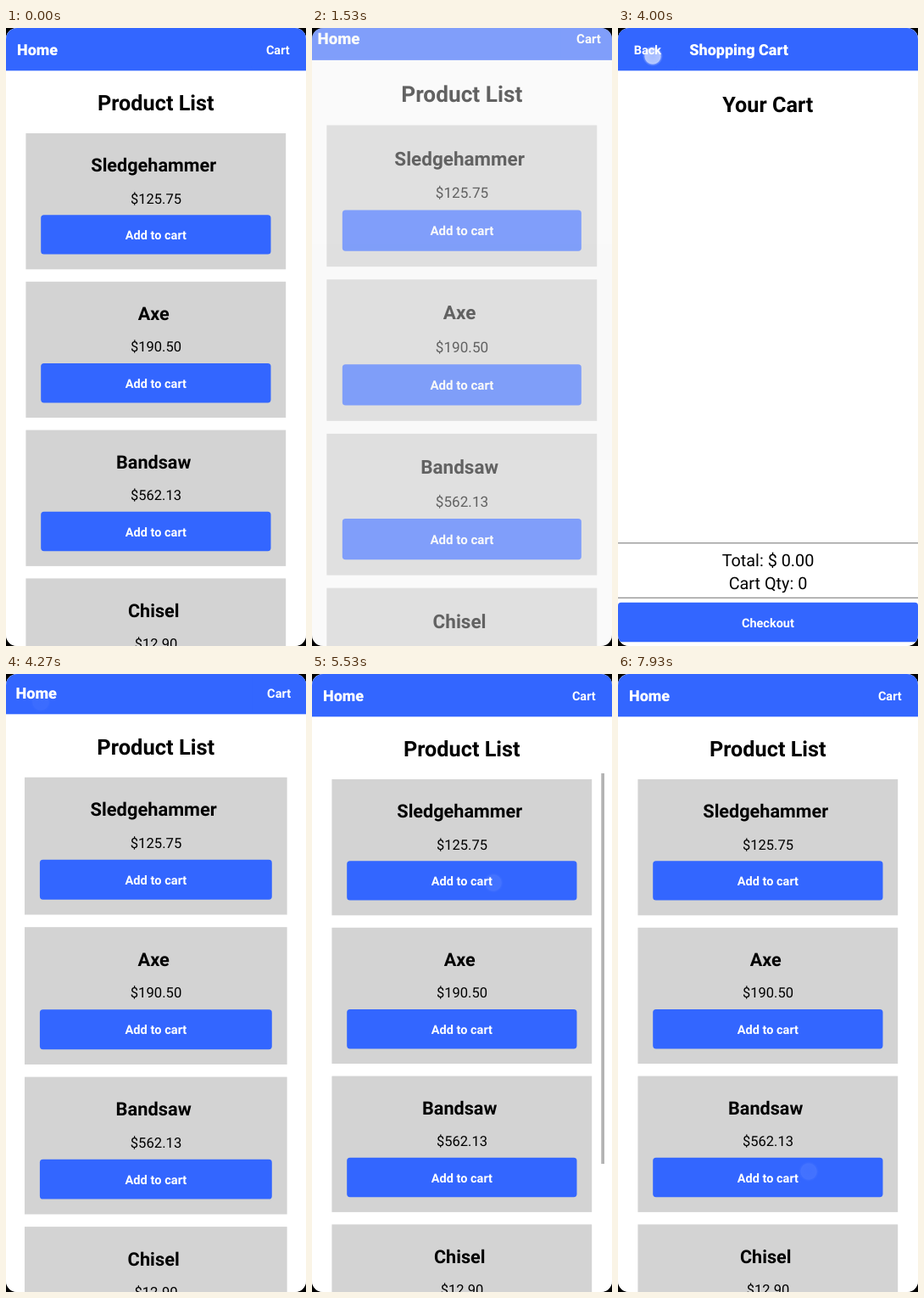
Animation of 354x728 px, one loop 8000 ms. Source, as an HTML page:

```html
<!DOCTYPE html>
<html lang="en">
<head>
<meta charset="utf-8">
<title>Tool shop</title>
<style>
  html, body { margin: 0; width: 100%; height: 100%; overflow: hidden; background: #000; }
  svg { display: block; width: 354px; height: 728px; border-radius: 13px; background: #f2f2f2; }
  text { font-family: Roboto, "Noto Sans", sans-serif; text-rendering: geometricPrecision; }
</style>
</head>
<body>
<svg id="stage" viewBox="0 0 354 728">
  <defs>
    <radialGradient id="spot">
      <stop offset="0" stop-color="#fff" stop-opacity=".56"/>
      <stop offset=".66" stop-color="#fff" stop-opacity=".62"/>
      <stop offset=".76" stop-color="#fff" stop-opacity=".66"/>
      <stop offset=".84" stop-color="#fff" stop-opacity=".24"/>
      <stop offset="1" stop-color="#fff" stop-opacity="0"/>
    </radialGradient>
  </defs>
</svg>
<script>
const LOOP = 8000;
const BLUE = '#3366ff', PRESSED = '#274bdb';
const PITCH = 174.8;
const stage = document.getElementById('stage');

function add(parent, tag, attrs, content) {
  const el = document.createElementNS('http://www.w3.org/2000/svg', tag);
  for (const key in attrs) el.setAttribute(key, attrs[key]);
  if (content) el.textContent = content;
  return parent.appendChild(el);
}
const box = (parent, x, y, width, height, fill, rx = 0) =>
  add(parent, 'rect', { x, y, width, height, fill, rx });
const label = (parent, str, x, y, size, weight, fill = '#000', anchor = 'middle') =>
  add(parent, 'text', { x, y, fill, 'font-size': size, 'font-weight': weight, 'text-anchor': anchor }, str);

function button(parent, str, x, y, width, textX, textY) {
  const rect = box(parent, x, y, width, 46.4, BLUE, 3.6);
  label(parent, str, textX, textY, 14.5, 700, '#fff');
  return rect;
}

function page(title, titleX) {
  const g = add(stage, 'g', {});
  box(g, 0, 0, 354, 728, '#fff');
  box(g, 0, 0, 354, 50.3, BLUE);
  label(g, title, titleX, 32.2, 18, 800, '#fff', 'start');
  return g;
}

// Product list
const home = page('Home', 13);
const cartLink = button(home, 'Cart', 289, 2, 64, 320.8, 31);
label(home, 'Product List', 176.8, 97.2, 25.24, 600);
const products = [
  ['Sledgehammer', '$125.75'], ['Axe', '$190.50'], ['Bandsaw', '$562.13'], ['Chisel', '$12.90']
];
const addButtons = products.map(([name, price], i) => {
  const y = 124 + i * PITCH;
  box(home, 23.4, y, 306.8, 160.3, '#d3d3d3');
  label(home, name, 174.2, y + 45.3, 21.63, 700);
  label(home, price, 177, y + 82.5, 16.5, 400);
  return button(home, 'Add to cart', 41.2, y + 96.2, 271.3, 176.9, y + 124.9);
});
const scrollbar = box(home, 341.3, 117, 3.7, 460, '#b3b3b3');

// Cart
const cart = page('Shopping Cart', 84.3);
const backLink = button(cart, 'Back', 1, 2, 68, 34.8, 31);
label(cart, 'Your Cart', 176.8, 99, 25.24, 700);
box(cart, 0, 606, 354, 1.4, '#999');
label(cart, 'Total: $ 0.00', 177, 633.8, 19.83, 400);
label(cart, 'Cart Qty: 0', 177, 660.7, 19.83, 400);
box(cart, 0, 670.6, 354, 1.4, '#999');
button(cart, 'Checkout', 0, 676.8, 354, 176.9, 706);

const dot = add(stage, 'circle', { r: 12, fill: 'url(#spot)' });

// start, x, y, pressed button
const taps = [
  [1130, 322, 32, cartLink],
  [4000, 41, 33, backLink],
  [5270, 214, 246, addButtons[0]],
  [5870, 214, 246, addButtons[0]],
  [6670, 216, 420, addButtons[1]],
  [7670, 225, 586, addButtons[2]]
];
const OPEN = 1447, CLOSE = 4105, SLIDE = 400;

// Piecewise linear value through [input, output] points
function ramp(v, points) {
  if (v <= points[0][0]) return points[0][1];
  for (let i = 1; i < points.length; i++) {
    const [a, p] = points[i - 1], [b, q] = points[i];
    if (v <= b) return p + (q - p) * (v - a) / (b - a);
  }
  return points[points.length - 1][1];
}

// cubic-bezier(.35, .45, 0, 1)
function ease(x) {
  if (x <= 0) return 0;
  if (x >= 1) return 1;
  const curve = (u, a, b) => 3 * u * (1 - u) ** 2 * a + 3 * u * u * (1 - u) * b + u ** 3;
  let lo = 0, hi = 1;
  for (let i = 0; i < 24; i++) {
    const mid = (lo + hi) / 2;
    if (curve(mid, .35, 0) < x) lo = mid; else hi = mid;
  }
  return curve(lo, .45, 1);
}

function pose(g, scale, opacity) {
  g.setAttribute('transform', `translate(177 364) scale(${scale}) translate(-177 -364)`);
  g.setAttribute('opacity', opacity);
  g.setAttribute('visibility', opacity > 0 ? 'visible' : 'hidden');
}

function render(t) {
  const closing = t >= CLOSE;
  const p = closing ? 1 - ease((t - CLOSE) / SLIDE) : ease((t - OPEN) / SLIDE);
  pose(home, 1 + .075 * p, ramp(p, [[.2075, 1], [1, 0]]));
  pose(cart, closing ? .925 + .075 * p : .85 + .15 * p, ramp(p, [[.75, 0], [.875, 1]]));

  scrollbar.setAttribute('opacity', t < 4515 ? 0 : ramp(t, [[5830, 1], [6110, 0]]));

  for (const tap of taps) tap[3].setAttribute('fill', BLUE);
  let alpha = 0;
  for (const [start, x, y, target] of taps) {
    const age = t - start;
    if (age < 0 || age > 280) continue;
    if (age >= 60 && age < 195) target.setAttribute('fill', PRESSED);
    dot.setAttribute('cx', x);
    dot.setAttribute('cy', y);
    alpha = ramp(age, [[125, 1], [275, 0.04], [280, 0]]);
  }
  dot.setAttribute('opacity', alpha);
}

const begin = performance.now();
function tick() {
  render((performance.now() - begin) % LOOP);
  requestAnimationFrame(tick);
}
tick();
</script>
</body>
</html>
```
